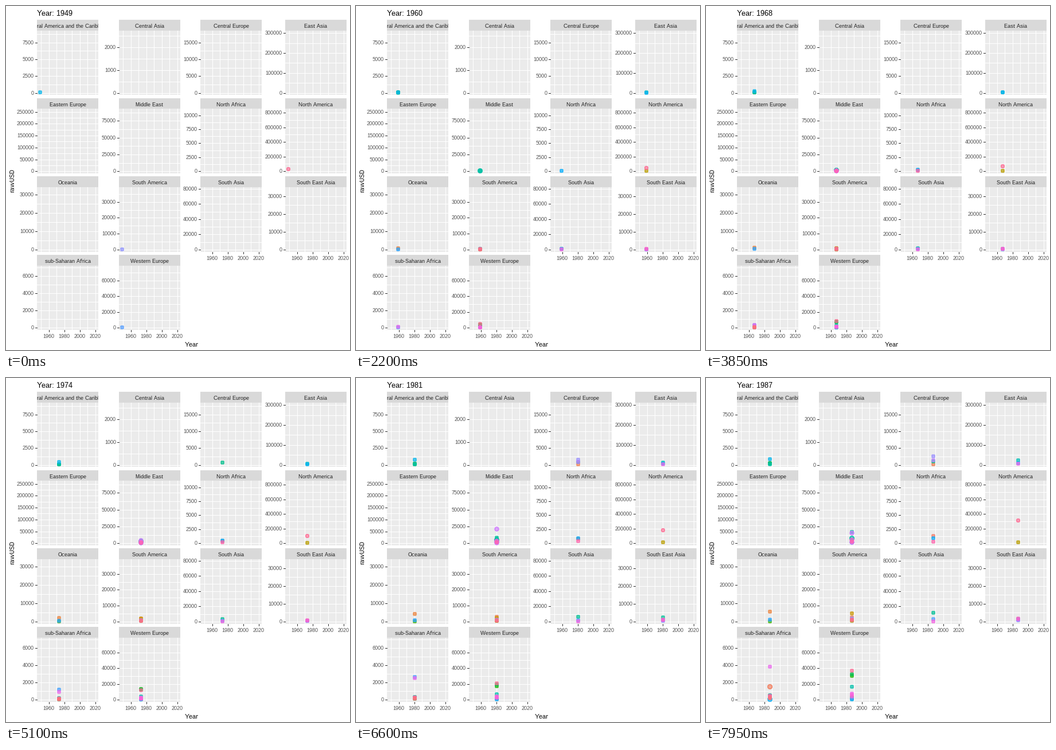
Write a matplotlib script that moves like this. It is 600x600 px and loops after 8000 ms.

```python
import math

import numpy as np
import matplotlib.pyplot as plt
from matplotlib.animation import FuncAnimation
from matplotlib.patches import Rectangle

FRAMES, STEP = 160, 50
START, SPAN, STEPS = 1949, 72, 299
PX = 0.72  # points per pixel at 100 dpi

LEFT = [54, 197, 339, 487]
WIDTH, PITCH = 107, 136.6

# name: major step, pixels per step
PANELS = {
    "Central America and the Caribbean": (2500, 29.3),
    "Central Asia": (1000, 40.0),
    "Central Europe": (5000, 29.3),
    "East Asia": (100000, 34.8),
    "Eastern Europe": (50000, 20.7),
    "Middle East": (25000, 29.3),
    "North Africa": (2500, 24.4),
    "North America": (200000, 25.5),
    "Oceania": (10000, 32.0),
    "South America": (10000, 27.7),
    "South Asia": (20000, 26.5),
    "South East Asia": (10000, 31.0),
    "sub-Saharan Africa": (2000, 30.0),
    "Western Europe": (20000, 27.6),
}
ORDER = list(PANELS)

plt.rcParams.update({"font.family": "Liberation Sans", "text.hinting": "default",
                     "text.hinting_factor": 1})
fig = plt.figure(figsize=(6, 6), dpi=100, facecolor="white")
ax = fig.add_axes([0, 0, 1, 1])
ax.set_xlim(0, 600)
ax.set_ylim(600, 0)
ax.axis("off")


def hcl(hue, c=100, l=65):
    """Polar LUV colour to RGB."""
    h = math.radians(hue)
    y = ((l + 16) / 116) ** 3
    u = c * math.cos(h) / (13 * l) + 0.1978
    v = c * math.sin(h) / (13 * l) + 0.4683
    x = 9 * y * u / (4 * v)
    z = (12 - 3 * u - 20 * v) * y / (4 * v)
    lin = np.array([3.2405 * x - 1.5371 * y - 0.4985 * z,
                    -0.9693 * x + 1.8760 * y + 0.0416 * z,
                    0.0556 * x - 0.2040 * y + 1.0572 * z])
    lin = np.clip(lin, 0, 1)
    return np.where(lin > 0.0031308, 1.055 * lin ** (1 / 2.4) - 0.055, 12.92 * lin)


def label(x, y, s, size=9, color="#4D4D4D", ha="center", va="baseline", **kw):
    return ax.text(x, y, s, fontsize=size * PX, color=color, ha=ha, va=va, **kw)


def mid(v):
    """Centre of the pixel that v rounds to."""
    return math.floor(v + 0.5) + 0.5


def row_y(first, row):
    return first + PITCH * row


def year_x(left, year):
    return left + 4.86 + (year - START) * 97.27 / SPAN


def zero_y(row):
    return row_y(150.6, row)


def box(x, y, w, h, color):
    return ax.add_patch(Rectangle((x, y), w, h, fc=color, lw=0, antialiased=False))


def draw_panel(i, name, step, px):
    row, col = divmod(i, 4)
    x0, x1 = LEFT[col], LEFT[col] + WIDTH
    head, top, bottom = (round(row_y(y, row)) for y in (24, 42.75, 155.4))
    strip = box(x0, head, WIDTH, top - head, "#D9D9D9")
    box(x0, top, WIDTH, bottom - top, "#EBEBEB")
    text = label(x0 + WIDTH / 2, head + 14, name, color="#1A1A1A", clip_on=True)
    text.set_clip_path(strip)

    line = dict(lw=PX, antialiased=False)
    n = int((zero_y(row) - top) / (px / 2))
    ys = [mid(zero_y(row) - k * px / 2) for k in range(n + 1)]
    xs = [mid(year_x(x0, year)) for year in range(1950, 2021, 10)]
    ax.hlines(ys, x0, x1, colors="white", **line)
    ax.vlines(xs, top, bottom, colors="white", **line)

    ax.hlines(ys[::2], x0 - 3, x0, colors="#333333", **line)
    for k, y in enumerate(ys[::2]):
        label(x0 - 5, y + 3.5, str(k * step), ha="right")
    if i >= len(PANELS) - 4:
        ax.vlines(xs[1::2], bottom, bottom + 3, colors="#333333", **line)
        for x, year in zip(xs[1::2], range(1960, 2021, 20)):
            label(x, bottom + 14, str(year))


for i, (name, scale) in enumerate(PANELS.items()):
    draw_panel(i, name, *scale)
title = label(54, 17, "", 13, "black", "left")
label(324, 593.5, "Year", 11, "black")
label(11.5, 304.5, "rawUSD", 11, "black", rotation=90, va="center")

countries = []


def country(region, hue, early, middle, late, since=1952, bump=0, size=5):
    """Steady growth from 1960 to 1978 to 1987, with a swell in the last stretch."""
    def spend(now):
        gap = now - 1978
        rate = math.log(middle / early) / 18 if gap < 0 else math.log(late / middle) / 9.3
        swell = bump * math.sin(math.pi * max(gap, 0) / 9.3)
        return middle * math.exp(rate * gap + swell)
    countries.append((hue, since, size, ORDER.index(region), spend))


def swarm(region, n, hue_a, hue_b, top, since=1952, size=5):
    """Small spenders, spread below a shared ceiling."""
    for k, hue in enumerate(np.linspace(hue_a, hue_b, n)):
        high = top * (1 - 0.75 * (k * 0.618 % 1))
        country(region, hue, high * 0.08, high * 0.45, high, since, size=size)


R = "Central America and the Caribbean"
country(R, 222, 90, 550, 850, since=1949, bump=0.2)
swarm(R, 4, 113, 180, 230)

R = "Central Europe"
country(R, 166, 300, 650, 950, since=1971)
swarm(R, 2, 268, 282, 2500, since=1980)
swarm(R, 1, 25, 25, 110, since=1980)

R = "East Asia"
country(R, 188, 500, 8500, 23000, bump=-0.25)
country(R, 229, 300, 3500, 7000)
swarm(R, 1, 312, 312, 4000, since=1975)

R = "Middle East"
country(R, 173, 200, 8500, 5500)
country(R, 177, 120, 2500, 16500, bump=0.35)
country(R, 179, 190, 4000, 7000, size=7.5)
country(R, 289, 40, 13700, 14700, since=1961, bump=0.48, size=6.5)
country(R, 323, 70, 2300, 4500, since=1961, size=6.5)
swarm(R, 2, 255, 295, 1200, since=1966, size=6.5)
swarm(R, 1, 348, 348, 2000, since=1961)

R = "North Africa"
country(R, 18, 50, 600, 1250, since=1962)
country(R, 237, 60, 820, 850)
country(R, 346, 10, 190, 200, since=1961, bump=0.6)

R = "North America"
country(R, 73, 1700, 4600, 9500, since=1950)
country(R, 359, 45500, 116000, 308000, since=1949, bump=0.15, size=5.5)

R = "Oceania"
country(R, 31, 450, 2900, 5100, since=1950, bump=0.15)
swarm(R, 1, 122, 122, 25, since=1970)
swarm(R, 1, 248, 248, 900, since=1950)

R = "South America"
country(R, 26, 300, 3200, 2500)
country(R, 62, 350, 2700, 4900, bump=-0.6)
swarm(R, 1, 265, 265, 1600, since=1949)
swarm(R, 3, 56, 110, 700)
swarm(R, 2, 360, 366, 1100)

R = "South Asia"
country(R, 170, 600, 4200, 11300)
country(R, 252, 250, 1000, 2600)
swarm(R, 1, 316, 316, 200)

R = "South East Asia"
country(R, 172, 500, 1900, 1300, since=1974, bump=0.4)
swarm(R, 3, 215, 298, 1000)
swarm(R, 1, 334, 334, 1700)

R = "sub-Saharan Africa"
country(R, 22, 1480, 1480, 1480, since=1985, size=7.5)
country(R, 250, 60, 3030, 220, since=1958, bump=0.78)
country(R, 307, 65, 2100, 3800)
swarm(R, 6, 42, 208, 520, since=1961)
swarm(R, 1, 235, 235, 60, since=1984, size=7)
swarm(R, 4, 336, 373, 420, since=1963)

R = "Western Europe"
country(R, 127, 3900, 19500, 30000, since=1950, bump=-0.33)
country(R, 142, 2900, 20600, 32300, bump=-0.27)
country(R, 181, 1100, 5700, 16200, bump=-0.2)
country(R, 358, 4900, 16200, 36500, since=1950)
swarm(R, 4, 33, 150, 3500)
swarm(R, 1, 231, 231, 40)
swarm(R, 1, 253, 253, 2100, since=1949)
swarm(R, 3, 312, 322, 7400)

countries.sort(key=lambda c: c[0])
dots = ax.scatter([], [], linewidths=PX, antialiased=False, zorder=5)


def update(frame):
    now = START + frame * SPAN / STEPS
    title.set_text(f"Year: {round(now)}")
    spots, sizes, colors = [], [], []
    for hue, since, size, i, spend in countries:
        if now < since:
            continue
        row, col = divmod(i, 4)
        step, px = PANELS[ORDER[i]]
        spots.append((mid(year_x(LEFT[col], now)),
                      mid(zero_y(row) - spend(now) * px / step)))
        sizes.append((size * PX) ** 2)
        colors.append((*hcl(hue), 0.6))
    dots.set_offsets(spots)
    dots.set_sizes(sizes)
    dots.set_facecolor(colors)
    dots.set_edgecolor(colors)
    return dots, title


anim = FuncAnimation(fig, update, frames=FRAMES, interval=STEP, repeat=True,
                     repeat_delay=0)
plt.show()
```
